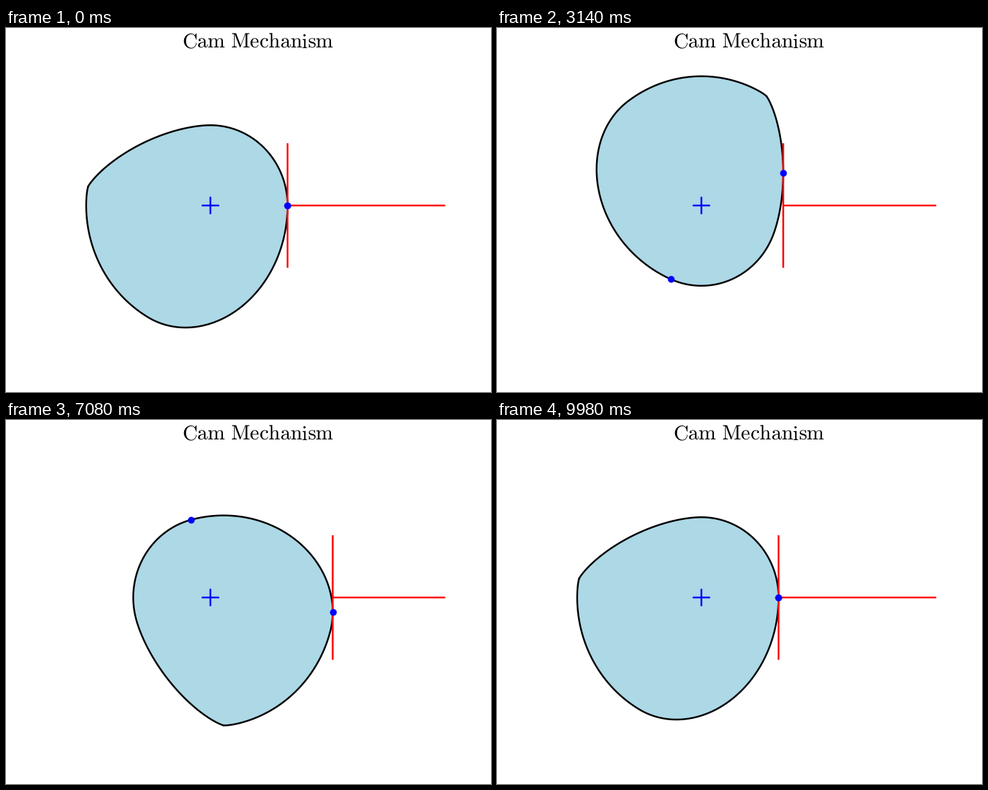
Recreate the animation shown at these times as a matplotlib script. Size 700 px wide and 525 px high, loop 10000 ms.

```python
import numpy as np
import matplotlib.pyplot as plt
from matplotlib.animation import FuncAnimation

W, H, DPI = 700, 525, 100
FRAMES, INTERVAL = 500, 20
PX = 72 / DPI                      # points per pixel
CX, CY = 295.0, 256.0              # cam shaft on the stage
KX, KY = 67.9, 70.6                # pixels per unit, unequal axes
BASE, LIFT = 1.64, 1.0             # base radius and follower lift
STEM_END, FACE = 634.0, 89.8
LINE = 2.5 * PX


def follower(theta):
    """Lift and its derivative: dwell, cycloidal rise, dwell, harmonic fall."""
    deg = np.degrees(theta)
    rise = np.clip((deg - 90) / 90, 0, 1)
    fall = np.clip((deg - 240) / 120, 0, 1)
    turn = 2 * np.pi * rise
    s = LIFT * (rise - np.sin(turn) / (2 * np.pi))
    s = s - LIFT / 2 * (1 - np.cos(np.pi * fall))
    v = LIFT / (np.pi / 2) * (1 - np.cos(turn))
    v = v - LIFT * 0.75 * np.sin(np.pi * fall)
    return s, v


def rotate(x, y, angle):
    c, s = np.cos(angle), np.sin(angle)
    return x * c - y * s, x * s + y * c


def to_stage(x, y):
    return CX + KX * x, CY - KY * y


theta = np.linspace(0, 2 * np.pi, 721)
lift, slope = follower(theta)
cam_x, cam_y = rotate(BASE + lift, slope, theta)

plt.rcParams["mathtext.fontset"] = "cm"
plt.rcParams["text.hinting"] = "none"

fig = plt.figure(figsize=(W / DPI, H / DPI), dpi=DPI, facecolor="white")
ax = fig.add_axes([0, 0, 1, 1])
ax.set_xlim(0, W)
ax.set_ylim(H, 0)
ax.axis("off")

ax.text(363.3, 28.3, r"$\mathrm{Cam\ Mechanism}$", fontsize=30 * PX,
        ha="center", va="baseline", color="black")


def stroke(color, z):
    line, = ax.plot([], [], color=color, lw=LINE, zorder=z,
                    solid_capstyle="butt", snap=False)
    return line


def dot():
    point, = ax.plot([], [], "o", color="blue", ms=9.8 * PX, mew=0,
                     zorder=5, snap=False)
    return point


cam, = ax.fill([CX], [CY], facecolor="lightblue", edgecolor="black", lw=LINE,
               joinstyle="round", zorder=1)
stroke("blue", 2).set_data([CX - 12.5, CX + 12.5], [CY, CY])
stroke("blue", 2).set_data([CX, CX], [CY - 12.5, CY + 12.5])
stem, face = stroke("red", 3), stroke("red", 3)
mark, contact = dot(), dot()


def update(i):
    angle = 2 * np.pi * i / (FRAMES - 1)
    s, v = follower(angle)
    cam.set_xy(np.column_stack(to_stage(*rotate(cam_x, cam_y, -angle))))
    mx, my = to_stage(*rotate(BASE, 0, -angle))
    px, py = to_stage(BASE + s, v)
    mark.set_data([mx], [my])
    contact.set_data([px], [py])
    stem.set_data([px, STEM_END], [CY, CY])
    face.set_data([px, px], [CY - FACE, CY + FACE])
    return cam, stem, face, mark, contact


anim = FuncAnimation(fig, update, frames=FRAMES, interval=INTERVAL,
                     init_func=lambda: update(0), repeat=True, repeat_delay=0)
plt.show()
```
